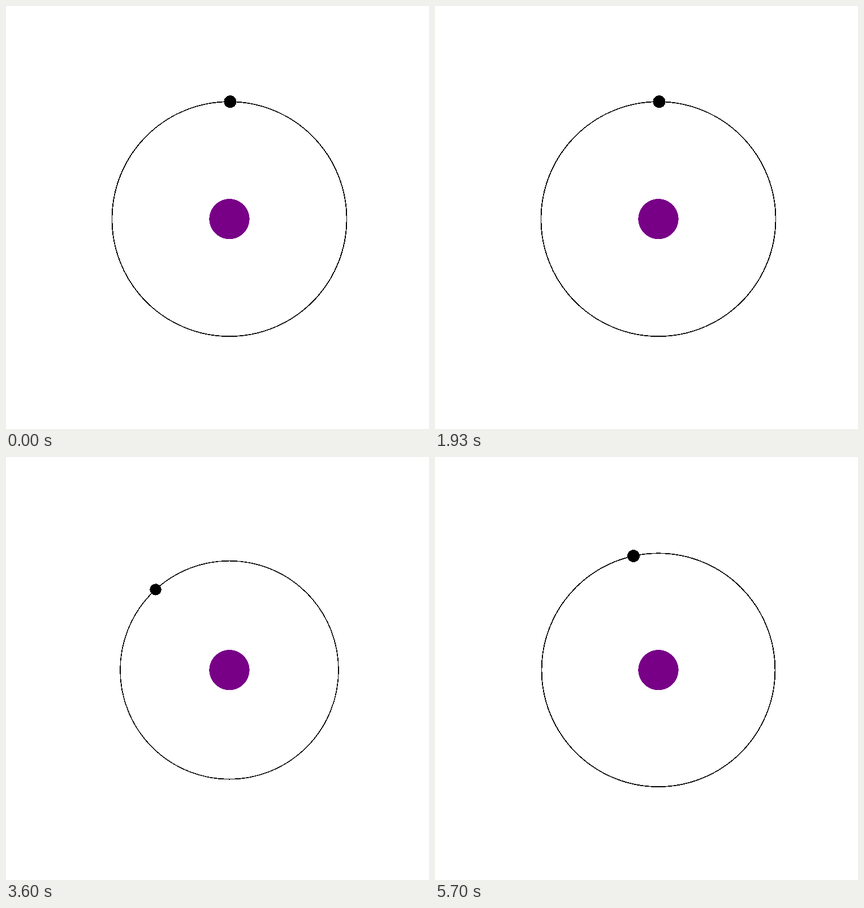
An HTML page for the animation above (5730 ms loop, 748 by 748 pixels).

```html
<!DOCTYPE html>
<html lang="en">
<head>
<meta charset="utf-8">
<title>Atom and molecule</title>
<style>
  html, body { margin: 0; width: 100%; height: 100%; overflow: hidden; background: #fff; }
  svg { display: block; width: 100vw; height: 100vh; }
</style>
</head>
<body>
<svg viewBox="0 0 748 748" shape-rendering="crispEdges">
  <defs>
    <filter id="goo" filterUnits="userSpaceOnUse" x="0" y="0" width="748" height="748" color-interpolation-filters="sRGB">
      <feGaussianBlur stdDeviation="4.5"/>
      <feColorMatrix values="0 0 0 0 .4706  0 0 0 0 0  0 0 0 0 .5294  0 0 0 40 -19.5"/>
    </filter>
  </defs>
  <rect width="748" height="748" fill="#fff"/>
  <circle id="orbit" fill="none" stroke="#000"/>
  <circle id="electron"/>
  <g id="bonds"></g>
  <g id="atoms" filter="url(#goo)" fill="#780087"></g>
</svg>
<script>
const LOOP = 5730, CYCLE = 48;
const CX = 395, CY = 376.7;
const STEPS = [0, 70, 100, 130, 170]; // five poses in every 200 ms

// Offset from the centre when fully open, radius, delay in steps
const atoms = {
  A: [0, -77.4, 24, 3],
  B: [-7.8, 32.6, 27.5, 4],
  C: [-75.5, 78.4, 25, 2],
  D: [-161.6, 23.8, 24, 2],
  E: [-129, -81, 27, 1],
  F: [-74, -146, 29.3, 4],
  G: [-129, -266, 35.6, 0],
  H: [-229.5, -122, 28.5, 0],
  I: [128, 86.2, 21.4, 1],
  J: [94, 183.4, 27, 2],
  K: [182.5, 261.5, 34.7, 4]
};
// Two ends and the line width at each of them
const bonds = [
  ['G', 'F', 13, 3], ['K', 'J', 12, 2], ['H', 'E', 7.5, 5], ['F', 'E', 6, 5],
  ['F', 'A', 6, 6], ['A', 'B', 5.5, 7.5], ['B', 'C', 5, 5], ['C', 'D', 7, 4],
  ['D', 'E', 4, 6], ['B', 'I', 5.5, 2.5], ['I', 'J', 2.5, 5]
];

const byId = id => document.getElementById(id);
const orbit = byId('orbit'), electron = byId('electron');

function add(parent, tag) {
  const node = document.createElementNS('http://www.w3.org/2000/svg', tag);
  return byId(parent).appendChild(node);
}
function set(node, attrs) {
  for (const key in attrs) node.setAttribute(key, attrs[key]);
}

const bondNodes = bonds.map(() => add('bonds', 'polygon'));
const atomNodes = {};
for (const name in atoms) {
  const r = atoms[name][2];
  atomNodes[name] = add('atoms', 'circle');
  set(atomNodes[name], { r: r + 10 / r }); // the blur shrinks small circles
}

// Ease with level ends; a and b are the handle positions in time
function ease(x, a, b) {
  if (x <= 0) return 0;
  if (x >= 1) return 1;
  let lo = 0, hi = 1;
  for (let i = 0; i < 30; i++) {
    const s = (lo + hi) / 2, q = 1 - s;
    if (3 * a * s * q * q + 3 * b * s * s * q + s * s * s < x) lo = s; else hi = s;
  }
  return lo * lo * (3 - 2 * lo);
}

const spread = t => t < 12.5
  ? ease(t / 11.5, .7, .17)
  : 1 - ease((t - 13.06) / 21.9, 1.175, .414);

function orbitRadius(p) {
  const closed = p < 25.5
    ? ease(p / 25.5, .5, .5)
    : 1 - ease((p - 25.5) / 22.2, .5, .5);
  return 207.5 - 128.5 * closed;
}

function draw(time) {
  const t = time % LOOP, part = t % 200;
  const step = Math.floor(t / 200) * 5 + STEPS.filter(s => s <= part).length - 1;
  const p = step % CYCLE;

  const r = orbitRadius(p), scale = r / 207.5;
  const angle = (.4 + 7.55 * p) * Math.PI / 180;
  set(orbit, { cx: CX, cy: CY, r, 'stroke-width': 1.7 * scale });
  set(electron, { cx: CX + r * Math.sin(angle), cy: CY - r * Math.cos(angle), r: 11 * scale });

  const at = {};
  for (const name in atoms) {
    const [dx, dy, , delay] = atoms[name];
    const k = spread(p - delay);
    const [x, y] = at[name] = [CX + dx * k, CY + dy * k];
    set(atomNodes[name], { cx: x, cy: y });
  }

  bonds.forEach(([from, to, w1, w2], i) => {
    const [x1, y1] = at[from], [x2, y2] = at[to];
    const len = Math.hypot(x2 - x1, y2 - y1) || 1;
    const nx = (y1 - y2) / len / 2, ny = (x2 - x1) / len / 2;
    set(bondNodes[i], { points: [
      x1 + nx * w1, y1 + ny * w1, x2 + nx * w2, y2 + ny * w2,
      x2 - nx * w2, y2 - ny * w2, x1 - nx * w1, y1 - ny * w1
    ].join(' ') });
  });
}

const start = performance.now();
function tick() {
  draw(performance.now() - start);
  requestAnimationFrame(tick);
}
tick();
</script>
</body>
</html>
```
